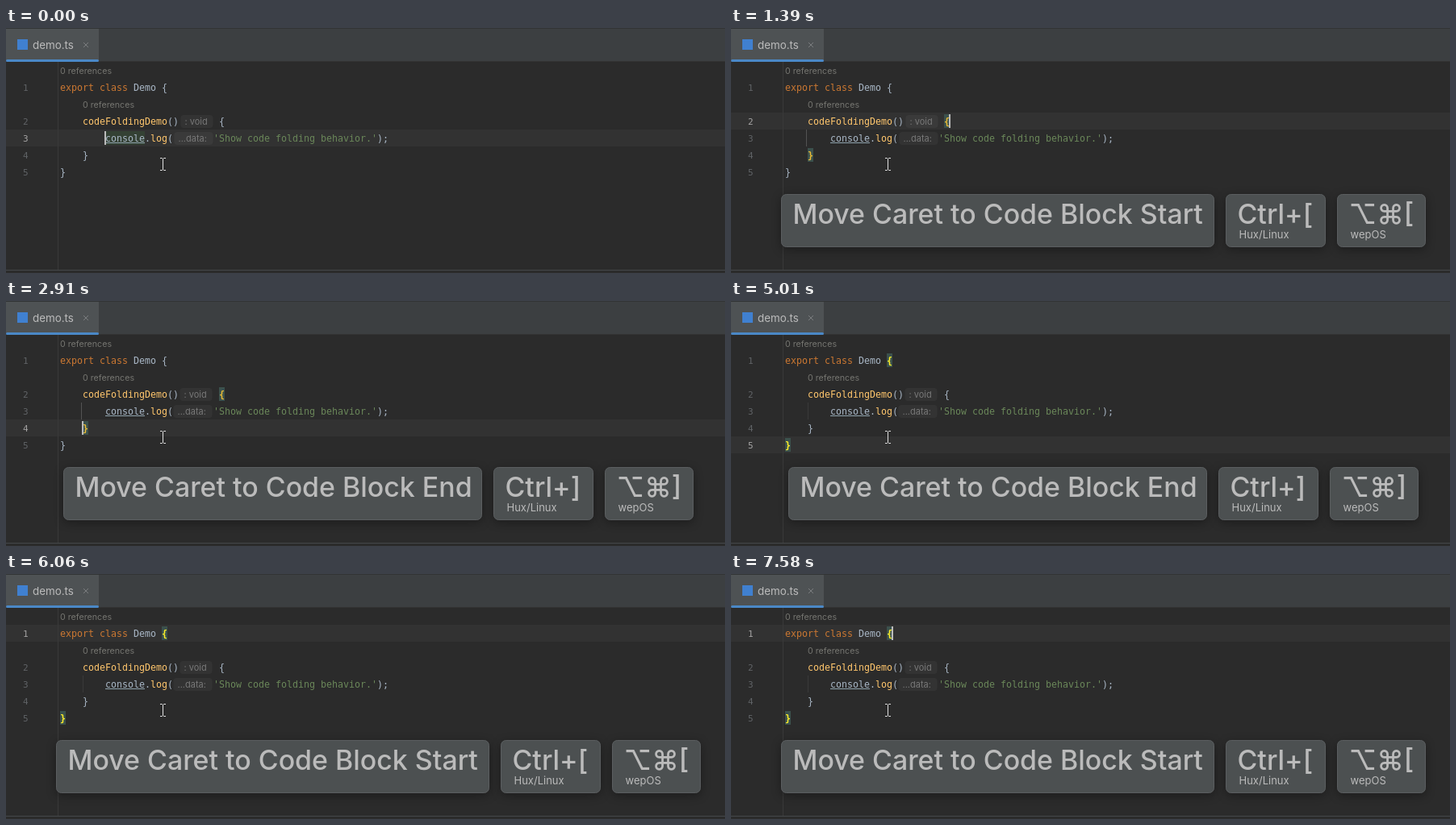
Recreate the animation shown at these times as an HTML page. Size 891 by 304 pixels, loop 8 s.

```html
<!DOCTYPE html>
<html lang="en">
<head>
<meta charset="utf-8">
<title>Code block navigation</title>
<style>
  html, body { margin: 0; width: 100%; height: 100%; overflow: hidden; background: #2b2b2b; }
  svg { display: block; width: 891px; height: 304px; }
  text { white-space: pre; font-optical-sizing: none; }
  .code { font: 11.63px "DejaVu Sans Mono", "Noto Sans Mono", monospace; fill: #a9b7c6; }
  .num { fill: #606366; font-size: 11px; }
  .num.on { fill: #a4a3a3; }
  .kw { fill: #cc7832; }
  .fn { fill: #ffc66d; }
  .str { fill: #6a8759; }
  .ui { font-family: Inter, "DejaVu Sans", sans-serif; fill: #bbb; }
  .small { font-size: 10.7px; fill: #757570; }
  .hint { font-size: 11px; fill: #787878; }
  .big { font-size: 33.9px; font-weight: 500; }
  .sub { font-size: 13px; }
  .box { fill: #4c5051; stroke: #5b5e60; filter: drop-shadow(0 3px 6px rgba(0, 0, 0, .35)); }
  .match rect { fill: none; }
  .match.on rect { fill: #3b514d; }
  .match.on text { fill: #ffef28; font-weight: bold; }
  .match.on[data-pair=method] text { fill: #e8ba36; }
</style>
</head>
<body>
<svg id="stage" viewBox="0 0 891 304"></svg>
<script>
const LOOP = 8000;
const rowTop = [0, 63, 105, 126, 147, 168];

const rect = (x, y, w, h, fill, more = '') =>
  `<rect x="${x}" y="${y}" width="${w}" height="${h}" fill="${fill}" ${more}/>`;
const text = (x, y, cls, s, more = '') =>
  `<text x="${x}" y="${y}" class="${cls}" ${more}>${s}</text>`;
const span = (cls, s) => `<tspan class="${cls}">${s}</tspan>`;
const code = (line, x, s) => text(x, rowTop[line] + 15, 'code', s);
const bracket = (pair, line, x, s) =>
  `<g class="match" data-pair="${pair}">${rect(x, rowTop[line] + 2, 7, 17, '')}${code(line, x, s)}</g>`;
const hint = (line, x, w, s) =>
  rect(x, rowTop[line] + 3, w, 16, '#fff', 'rx="4" fill-opacity=".04"') +
  text(x + 5, rowTop[line] + 15, 'ui hint', s);

function box(x, w, label, sub) {
  return `<rect class="box" x="${x + .5}" y="206.5" width="${w - 1}" height="65" rx="6"/>` +
    text(x + 14.5, 242.5, 'ui big', label) +
    (sub ? text(x + 16.5, 261, 'ui sub', sub) : '');
}

function panel(id, x, w, label, key) {
  const k = x + w + 14;
  return `<g id="${id}">` + box(x, w, label) +
    box(k, 124, 'Ctrl+' + key, 'Hux/Linux') +
    box(k + 138, 110, '⌥⌘' + key, 'wepOS') + '</g>';
}

const stage = document.getElementById('stage');
stage.innerHTML = [
  rect(0, 0, 891, 304, '#2b2b2b'),
  // tab bar
  rect(0, 0, 891, 41, '#3c3f41'),
  rect(0, 0, 891, 1, '#323435'),
  rect(0, 41, 891, 1, '#323232'),
  rect(0, 1, 115, 39, '#4e5254'),
  rect(0, 39, 115, 3, '#4a88c7', 'rx="1.5"'),
  rect(14, 14, 13, 13, '#4080d0'),
  text(33, 26, 'ui', 'demo.ts', 'font-size="13.4"'),
  '<path d="M96 18l6 6m0-6l-6 6" stroke="#7b7e80"/>',
  // editor
  rect(0, 0, 891, 21, '#323232', 'id="row"'),
  rect(64, 42, 1, 258, '#393939'),
  rect(95, 126, 1, 21, '#393939', 'id="guide"'),
  rowTop.slice(1).map((y, i) => text(21, y + 15, 'code num', i + 1)).join(''),
  text(67, 57, 'ui small', '0 references'),
  text(95, 99, 'ui small', '0 references'),
  rect(123, 128, 49, 17, '#344134', 'id="word"'),
  rect(95, 107, 105, 17, '#344134', 'id="name"'),
  code(1, 67, span('kw', 'export class') + ' Demo'),
  bracket('class', 1, 193, '{'),
  code(2, 95, span('fn', 'codeFoldingDemo')),
  bracket('args', 2, 200, '('),
  bracket('args', 2, 207, ')'),
  bracket('method', 2, 264, '{'),
  code(3, 123, 'console.' + span('fn', 'log') + '('),
  rect(123, 142, 49, 1, '#8fa3ad'),
  code(3, 257, span('str', "'Show code folding behavior.'") + ');'),
  bracket('method', 4, 95, '}'),
  bracket('class', 5, 67, '}'),
  '<g id="hints">' + hint(2, 216.5, 40, ': void') + hint(3, 208.5, 48, '...data:') + '</g>',
  rect(0, 0, 2, 17, '#bbb', 'id="caret"'),
  // bottom edge
  rect(0, 300, 891, 1, '#45484a'),
  panel('start', 62, 537, 'Move Caret to Code Block Start', '['),
  panel('end', 71, 519, 'Move Caret to Code Block End', ']'),
  // mouse pointer
  '<path d="M191 161.5h2.5l1 1 1-1h2.5M194.5 162v14M191 176.5h2.5l1-1 1 1h2.5" fill="none" stroke="#e0e0e0"/>'
].join('');

const $ = id => document.getElementById(id);
const nums = [...stage.querySelectorAll('.num')];
const matches = [...stage.querySelectorAll('.match')];

// from (ms), line, caret x, caret shown, matched pair, panel
const steps = [
  [0, 3, 123, 1, '', ''],
  [460, 3, 123, 0, '', ''],
  [990, 3, 123, 1, '', ''],
  [1390, 2, 271, 1, 'method', 'start'],
  [1980, 2, 271, 0, 'method', 'start'],
  [2450, 2, 271, 1, 'method', 'start'],
  [2910, 4, 95, 1, 'method', 'end'],
  [3460, 4, 95, 0, 'method', 'end'],
  [4020, 4, 95, 1, 'method', 'end'],
  [4480, 5, 67, 1, 'class', 'end'],
  [5010, 5, 67, 0, 'class', 'end'],
  [5140, 1, 200, 1, 'class', 'end'],
  [5200, 1, 200, 1, 'class', 'start'],
  [6060, 1, 200, 0, 'class', 'start'],
  [6400, 2, 200, 1, '', 'start'],
  [6930, 2, 200, 0, 'args', 'start'],
  [7580, 1, 200, 1, 'class', 'start']
];

const show = (id, on) => { $(id).style.display = on ? '' : 'none'; };
let current = null;

function apply(step) {
  const [from, line, x, on, pair, tip] = step;
  const lit = pair === 'method' || pair === 'args';
  $('row').setAttribute('y', rowTop[line]);
  $('caret').setAttribute('x', x - 1);
  $('caret').setAttribute('y', rowTop[line] + 2);
  show('caret', on);
  nums.forEach((n, i) => n.classList.toggle('on', i + 1 === line));
  matches.forEach(m => m.classList.toggle('on', m.dataset.pair === pair));
  show('word', line === 3);
  show('name', pair === 'args');
  show('guide', line !== 3);
  $('guide').setAttribute('x', lit ? 93 : 95);
  $('guide').setAttribute('fill', lit ? '#535353' : '#393939');
  $('hints').setAttribute('transform', `translate(${from < 2910 ? 0 : -1} 0)`);
  show('start', tip === 'start');
  show('end', tip === 'end');
}

function draw(now) {
  const t = now % LOOP;
  const step = steps.findLast(s => s[0] <= t) || steps[0];
  if (step !== current) apply(current = step);
}

const begin = performance.now();
function tick() {
  draw(performance.now() - begin);
  requestAnimationFrame(tick);
}
tick();
</script>
</body>
</html>
```
